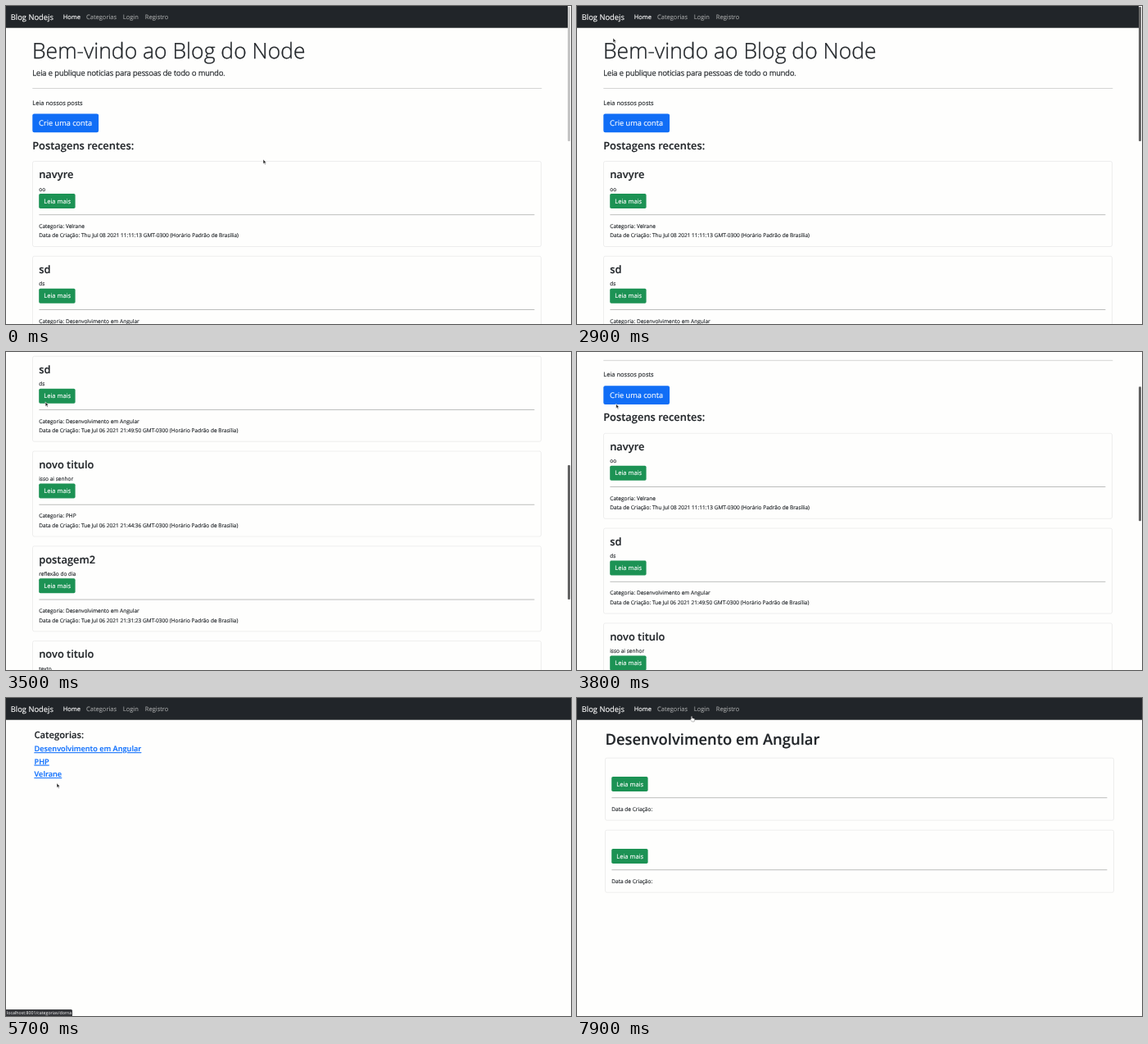
An HTML page for the animation above (8 s loop, 690 px wide and 388 px high).

```html
<!DOCTYPE html>
<html lang="pt-BR">
<head>
<meta charset="utf-8">
<title>Blog Nodejs</title>
<style>
  html, body { margin: 0; width: 100%; height: 100%; overflow: hidden; background: #fefefd; }
  #stage { position: relative; width: 690px; height: 388px; overflow: hidden; }
  svg { display: block; }
  text {
    font-family: "Open Sans", "Noto Sans", sans-serif; color: #212529; fill: currentColor;
    stroke: currentColor; stroke-width: .14; text-rendering: geometricPrecision; white-space: pre;
  }
  .light { font-weight: 300; stroke-width: .35; }
  .head { font-weight: 600; }
  .white { color: #fff; }
  .dim { color: #9b9d9e; }
  .link { color: #0d6efd; font-weight: 600; text-decoration: underline; }
  .link.hover { color: #0a58ca; }
  .card { fill: none; stroke: #e3e3e2; stroke-width: .6; }
  .cursor { stroke: #fff; stroke-width: .6; stroke-linejoin: round; fill: #222; }
  #hand { stroke: #444; stroke-width: .35; fill: #fff; }
  #status {
    position: absolute; left: 0; bottom: 0; height: 8px; padding: 0 1px; box-sizing: border-box;
    font: 5.25px/8px "Open Sans", "Noto Sans", sans-serif; color: #fff; background: #35363a;
    border-top-right-radius: 1.5px; white-space: nowrap; text-rendering: geometricPrecision;
  }
</style>
</head>
<body>
<div id="stage">
  <svg width="690" height="388" viewBox="0 0 690 388">
    <g id="home"></g>
    <g id="list"></g>
    <g id="topic"></g>
    <rect id="thumb" x="686" width="3" height="164" rx="1"/>
    <path id="arrow" class="cursor" d="M0 0V5.6L1.3 4.5L2.2 6.5L3.2 6L2.3 4.2H4Z"/>
    <path id="hand" class="cursor" d="M.4 .6Q1 -.2 1.6 .6V2.6L4.3 3.2Q4.9 3.5 4.7 4.3L4.1 6.9H1.4L-.7 4.3Q-.5 3.4 .4 4Z"/>
  </svg>
  <div id="status"></div>
</div>
<script>
const LOOP = 8000, STEP = 100;
const BODY = 7.5, SMALL = 6.54;
const BLUE = '#116ef6', GREEN = '#1c9254', PALE = '#d4d5d4', GREY = '#bcbdbc';
const $ = id => document.getElementById(id);

const text = (x, y, size, str, cls = '') =>
  `<text x="${x}" y="${y}" font-size="${size}" class="${cls}">${str}</text>`;
const box = (x, y, w, h, fill, r = 0) =>
  `<rect x="${x}" y="${y}" width="${w}" height="${h}" fill="${fill}" rx="${r}"/>`;
const rule = (x, y, w, color) => box(x, y, w, 1, color);

const nav = w => box(0, 0, w, 26.7, '#212529') +
  text(5.8, 16.8, 9.35, 'Blog Nodejs', 'white') +
  text(69.7, 16.2, BODY, 'Home', 'white') +
  text(98, 16.2, BODY, 'Categorias', 'dim categories') +
  text(142.8, 16.2, BODY, 'Login', 'dim') +
  text(169.8, 16.2, BODY, 'Registro', 'dim');

// A bordered card: button and rule, then lines of small print below.
const card = (x, y, h, buttonY, inner, lines) =>
  `<g transform="translate(${x} ${y})">` +
  `<rect class="card" width="621" height="${h}" rx="2"/>` + inner +
  box(7.7, buttonY, 44.4, 18, GREEN, 1.8) +
  text(13.8, buttonY + 11.7, BODY, 'Leia mais', 'white') +
  rule(7.9, buttonY + 25.2, 605, GREY) +
  lines.map((line, i) => text(7.8, buttonY + 41.8 + i * 11.6, SMALL, line)).join('') +
  '</g>';

const TOPICS = [
  { name: 'Desenvolvimento em Angular', slug: '/angular' },
  { name: 'PHP', slug: '/php' },
  { name: 'Velrane', slug: '/dorna' }
];
const POSTS = [
  ['navyre', 'oo', 2, 'Thu Jul 08 2021 11:11:13'],
  ['sd', 'ds', 0, 'Tue Jul 06 2021 21:49:50'],
  ['novo titulo', 'isso ai senhor', 1, 'Tue Jul 06 2021 21:44:36'],
  ['postagem2', 'reflexão do dia', 0, 'Tue Jul 06 2021 21:31:23'],
  ['novo titulo', 'texto', 1, 'Tue Jul 06 2021 21:30:08']
];
const post = ([title, body, topic, date], i) => card(32.5, 189.5 + i * 115.8, 104, 39.5,
  text(7.7, 20.7, 12.9, title, 'head') + text(7.7, 36.2, SMALL, body),
  ['Categoria: ' + TOPICS[topic].name,
   `Data de Criação: ${date} GMT-0300 (Horário Padrão de Brasília)`]);

$('home').innerHTML = nav(686) +
  text(32, 64.4, 26.5, 'Bem-vindo ao Blog do Node', 'light') +
  text(32.3, 84.8, 9.4, 'Leia e publique noticias para pessoas de todo o mundo.', 'light') +
  rule(32.3, 100, 622, PALE) +
  text(32.3, 120.7, BODY, 'Leia nossos posts') +
  box(32.3, 131.4, 80.8, 22.8, BLUE, 2.2) +
  text(40.1, 146.2, 9.2, 'Crie uma conta', 'white') +
  text(32.2, 174.5, 12.9, 'Postagens recentes:', 'head') +
  POSTS.map(post).join('');

$('list').innerHTML = nav(690) +
  text(34.4, 49, 11.25, 'Categorias:', 'head') +
  TOPICS.map((t, i) => text(34.6, 65.2 + i * 15.45, 9.18, t.name, 'link')).join('');

$('topic').innerHTML = nav(690) +
  text(34.4, 56.6, 18.4, TOPICS[0].name, 'head') +
  [0, 1].map(i => card(34.5, 73.2 + i * 88, 76, 22.8, '', ['Data de Criação:'])).join('');

// Links that react to the pointer; a missing page means every page.
const target = (el, url, pad, page) => {
  const b = el.getBBox();
  return { el, url, page, x0: b.x - pad, x1: b.x + b.width + pad, y0: b.y - pad, y1: b.y + b.height + pad };
};
const URL_BASE = 'localhost:8001/categorias';
const linkEls = [...$('list').querySelectorAll('.link')];
const targets = [
  target($('list').querySelector('.categories'), URL_BASE, 5),
  ...linkEls.map((el, i) => target(el, URL_BASE + TOPICS[i].slug, 0, 'list'))
];

// Key points: time, then values.
const POINTER = [
  [1500, 314, 187], [2000, 225, 203.7], [2400, 30, 82], [2900, 44, 39], [3200, 48.5, 58.5],
  [3900, 47.5, 64], [4700, 106, 13], [5400, 106, 13], [5500, 64, 92], [5700, 62, 103.8],
  [6300, 62, 103.8], [7000, 100, 60], [7300, 100, 60], [7800, 139, 22]
];
const SCROLL = [[3000, 0], [3200, 280.3], [3400, 370], [3800, 90.2], [3900, 0]];

function tween(keys, t) {
  const i = keys.findIndex(k => k[0] > t);
  if (i < 0) return keys.at(-1).slice(1);
  if (i === 0) return keys[0].slice(1);
  const a = keys[i - 1], b = keys[i], k = (t - a[0]) / (b[0] - a[0]);
  return a.slice(1).map((v, j) => v + (b[j + 1] - v) * k);
}

const pageAt = t => t < 5000 ? 'home' : t < 7300 ? 'list' : 'topic';

function linkAt(t) {
  const [x, y] = tween(POINTER, t), page = pageAt(t);
  return targets.find(l => (!l.page || l.page === page) &&
    x > l.x0 && x < l.x1 && y > l.y0 && y < l.y1);
}

// The address shows a moment after hovering and lingers on the same page.
function statusAt(t) {
  for (let lag = 200; lag <= 700; lag += STEP) {
    const link = pageAt(t - lag) === pageAt(t) && linkAt(t - lag);
    if (link) return link.url;
  }
  return '';
}

const show = (el, on) => { el.style.display = on ? '' : 'none'; };

function draw(now) {
  const t = Math.floor(now % LOOP / STEP) * STEP;
  const page = pageAt(t), link = linkAt(t), url = statusAt(t);
  const [scroll] = tween(SCROLL, t);

  for (const id of ['home', 'list', 'topic']) show($(id), id === page);
  $('home').setAttribute('transform', `translate(0 ${-scroll})`);
  show($('thumb'), page === 'home');
  $('thumb').setAttribute('y', 1 + scroll * .457);
  $('thumb').setAttribute('fill', t < 600 ? '#c4c4c4' : '#636363');

  for (const el of linkEls) el.classList.toggle('hover', link?.el === el);
  show($('arrow'), !link);
  show($('hand'), link);
  $(link ? 'hand' : 'arrow').setAttribute('transform', `translate(${tween(POINTER, t)})`);
  show($('status'), url);
  $('status').textContent = url;
}

function tick() {
  draw(performance.now());
  requestAnimationFrame(tick);
}
tick();
</script>
</body>
</html>
```
